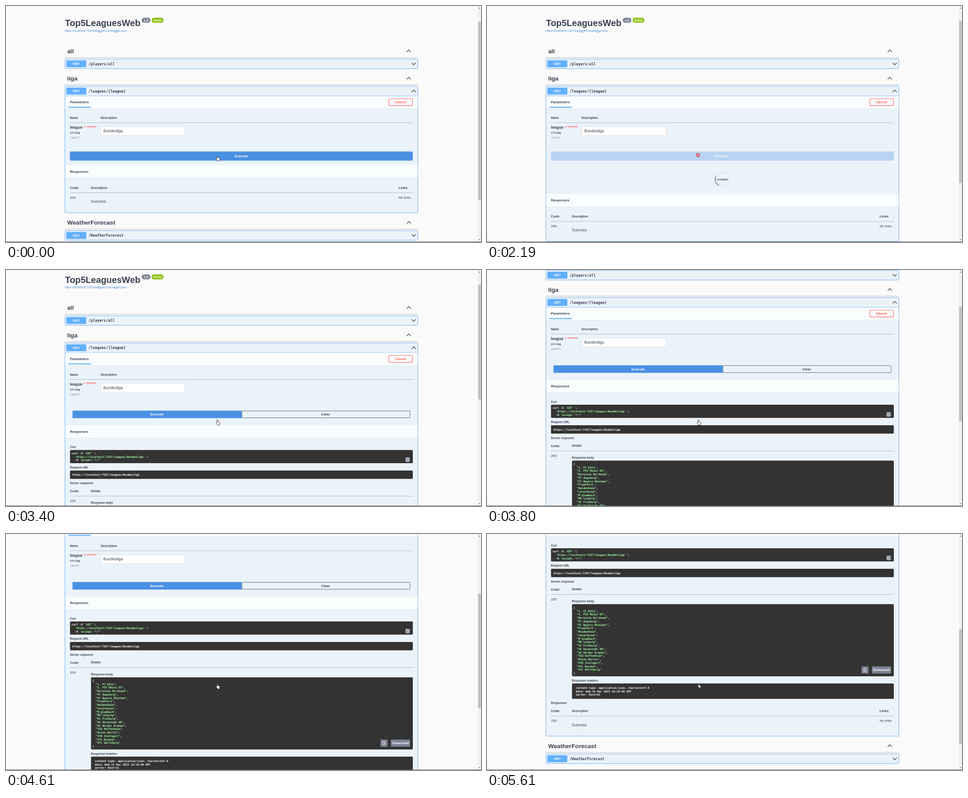
Animation of 1059 by 529 pixels, one loop 6.61 s. Source, as an HTML page:

```html
<!DOCTYPE html>
<html lang="en">
<head>
<meta charset="utf-8">
<title>API explorer</title>
<style>
  html, body { margin: 0; width: 100%; height: 100%; overflow: hidden; background: #fafafa; }
  svg { display: block; width: 1059px; height: 529px; }
  text { font-family: "Liberation Sans", Arial, sans-serif; fill: #3b4151; white-space: pre; }
  .b { font-weight: 700; }
  .i { font-style: italic; }
  .mid { text-anchor: middle; }
  .mono { font-family: "DejaVu Sans Mono", monospace; }
  .white { fill: #fff; }
  .green { fill: #a2fca2; }
  .grey { fill: #808080; }
  .red { fill: #ff5a52; }
  .link { fill: #4990e2; }
</style>
</head>
<body>
<svg id="stage" viewBox="0 0 1059 529"></svg>
<script>
const LOOP = 6610, LOAD_START = 490, LOAD_END = 2600, ARROW_START = 5600;
const TINY = 5.52, SMALL = 6.62, BASE = 7.72, LARGE = 8.83, HEADING = 13.24, CODE = 6.06;

// y is the middle of the capitals
const text = (x, y, size, content, cls = 'b') =>
  `<text x="${x}" y="${y + size * 0.36}" font-size="${size}" class="${cls}">${content}</text>`;
const box = (x1, y1, x2, y2, fill, extra = '') =>
  `<rect x="${x1}" y="${y1}" width="${x2 - x1}" height="${y2 - y1}" fill="${fill}" ${extra}/>`;
const path = (d, stroke, width = 1.1, extra = '') =>
  `<path d="${d}" fill="none" stroke="${stroke}" stroke-width="${width}" ${extra}/>`;
const rule = (x1, x2, y) => box(x1, y - 0.4, x2, y + 0.4, '#3b4151', 'opacity=".42"');
const chevron = (x, y, up) => {
  const d = up ? -2.4 : 2.4;
  return path(`M${x - 4.6} ${y - d}L${x} ${y + d}L${x + 4.6} ${y - d}`, '#22262d', 1.2);
};
const green = s => `<tspan class="green">${s}</tspan>`;
const code = (x, y, content) => text(x, y, CODE, content, 'mono b white');
const dark = (x, y1, y2) => box(x, y1, 907, y2, '#333', 'rx="2.2"');

const tagHeading = (y, name) =>
  text(136.5, y, HEADING, name) + chevron(898, y - 0.3, true) + rule(131, 918, y + 14.4);
const blockFrame = (y1, y2) =>
  box(131, y1 - 0.5, 918.5, y2 + 0.7, 'none', 'rx="2.5" stroke="#000" stroke-opacity=".07"') +
  box(131.6, y1, 918, y2, '#ebf3fa', 'rx="2.2" stroke="#61affe" stroke-width=".9"');
const summary = (y, route, open) =>
  box(134.5, y - 7.7, 179, y + 7.7, '#61affe', 'rx="1.7"') +
  text(156.7, y, BASE, 'GET', 'b white mid') +
  text(184, y + 0.2, 8.1, route, 'mono b') + chevron(909, y, open);
const sectionHeader = (y1, y2) =>
  box(132, y1, 917.5, y2, '#fafdfe') + box(132, y2, 917.5, y2 + 1, '#000', 'opacity=".06"');
const columns = (y, second) =>
  text(142.5, y, BASE, 'Code') + text(189.3, y, SMALL, second) + rule(142.5, 907, y + 11.4);
const clipboard = (x, y, size) =>
  box(x - size / 2, y - size / 2, x + size / 2, y + size / 2, '#7d8293', 'rx="2"') +
  path(`M${x + 2} ${y - 1}v-2h-5v6.5h5v-1.5M${x - 1.8} ${y - 3.6}h2.6M${x + 4} ${y + 0.7}h-4.2l1.5-1.5m-1.5 1.5l1.5 1.5`, '#fff', 0.8);

const clubs = ['1. FC Köln', '1. FSV Mainz 05', 'Borussia Dortmund', 'FC Augsburg',
  'FC Bayern München', 'Frankfurt', 'Heidenheim', 'Leverkusen', "M'gladbach", 'RB Leipzig',
  'SC Freiburg', 'SV Darmstadt 98', 'SV Werder Bremen', 'TSG Hoffenheim', 'Union Berlin',
  'VfB Stuttgart', 'VfL Bochum', 'VfL Wolfsburg'];
const json = ['[', ...clubs.map((name, i) =>
  '  ' + green(`"${name}"`) + (i < clubs.length - 1 ? ',' : '')), ']'];
const endpoint = 'https://localhost:7197/leagues/Bundesliga';

const top5 =
  text(131.5, 38.2, 19.86, 'Top5LeaguesWeb') +
  box(302.5, 26.3, 322, 37.6, '#7d8492', 'rx="5.6"') + text(312.3, 32, 7.2, '1.0', 'b white mid') +
  box(324.5, 26.3, 351.2, 37.6, '#89bf04', 'rx="5.6"') + text(337.8, 32, 7.2, 'OAS3', 'b white mid') +
  text(131, 55.4, SMALL, 'https://localhost:7197/swagger/v1/swagger.json', 'link') +
  tagHeading(101, 'all') + blockFrame(119, 140.3) + summary(129.6, '/players/all', false) +
  tagHeading(162.3, 'liga');

const parameters =
  summary(190.7, '/leagues/{league}', true) +
  box(132, 201, 918, 201.9, '#61affe', 'opacity=".8"') + sectionHeader(202, 230) +
  text(142.5, 215.7, BASE, 'Parameters') + box(138.8, 225.8, 189, 228, '#61affe') +
  box(853.5, 208, 906.3, 223.3, 'none', 'rx="2" stroke="#ff6060" stroke-width="1.2"') +
  text(879.5, 215.6, BASE, 'Cancel', 'b red mid') +
  text(142.5, 251, SMALL, 'Name') + text(211, 251, SMALL, 'Description') + rule(142.5, 907, 261.7) +
  text(142.5, 272, LARGE, 'league') + text(173, 271.5, LARGE, '*', 'b red') +
  text(179.2, 270, TINY, 'required', 'b red') +
  text(142.5, 284.3, CODE, 'string', 'mono b') + text(142.5, 295, CODE, '(path)', 'mono i grey') +
  box(211.3, 270.4, 399.2, 290.6, '#fff', 'rx="2" stroke="#d4d8dc" stroke-width=".8"') +
  text(217, 280.3, LARGE, 'Bundesliga', '');

const wideExecute =
  box(142, 325.7, 907.3, 346.9, 'none', 'rx="2.2" stroke="#a9c9ee" stroke-width="1"') +
  box(142.8, 326.4, 906.6, 346.2, '#4990e2', 'rx="2"') +
  text(524.5, 336.4, BASE, 'Execute', 'b white mid');

const spinner =
  '<circle cx="524.7" cy="388.6" r="16" fill="none" stroke="#555" stroke-opacity=".14" stroke-width="1.1"/>' +
  path('M513.4 377.3A16 16 0 0 1 536 377.3', '#000', 1.2, 'id="arc" stroke-opacity=".6"') +
  text(524.7, 388.6, TINY, 'LOADING', 'b mid');

const result =
  box(148, 331.6, 526, 348.6, 'none', 'rx="2" stroke="#a9c9ee"') +
  box(148.5, 332, 525.6, 348.2, '#4990e2', 'rx="1.5"') +
  text(336.5, 340.2, BASE, 'Execute', 'b white mid') +
  box(526, 332.4, 900.7, 347.8, 'none', 'rx="1.5" stroke="#7b8086" stroke-width="1.2"') +
  text(712.5, 340.2, BASE, 'Clear', 'b mid') +
  text(142.5, 413.2, SMALL, 'Curl') + dark(142.7, 420, 449.6) +
  code(146, 427.2, `curl -X ${green("'GET'")} \\`) +
  code(146, 435, `  ${green(`'${endpoint}'`)} \\`) +
  code(146, 442.7, `  -H ${green("'accept: */*'")}`) +
  clipboard(895.6, 441.6, 10.5) +
  text(142.5, 459, SMALL, 'Request URL') + dark(142.7, 466, 484.7) + code(148, 475.5, endpoint) +
  text(142.5, 494.2, SMALL, 'Server response') + columns(512, 'Details') +
  text(142.5, 534, BASE, '200', '') + text(189.3, 538.6, SMALL, 'Response body') +
  dark(189.5, 545.2, 707) +
  json.map((line, i) => code(192.8, 552.7 + i * 7.75, line)).join('') +
  clipboard(842.8, 692.8, 16) + box(858, 684.8, 901, 700.8, '#7d8293', 'rx="2"') +
  text(879.5, 692.5, BASE, 'Download', 'b white mid') +
  text(189.3, 716.5, SMALL, 'Response headers') + dark(189.5, 723, 757.6) +
  ['content-type: application/json; charset=utf-8', 'date: Wed,13 Dec 2023 16:16:08 GMT', 'server: Kestrel']
    .map((line, i) => code(198, 732.7 + i * 7.75, line)).join('') +
  text(142.5, 767, SMALL, 'Responses');

const tail =
  columns(407.2, 'Description') + text(875.2, 407.2, BASE, 'Links') +
  text(142.5, 428.8, BASE, '200', '') + text(875.2, 428.8, BASE, 'No links', 'i') +
  text(189.3, 438, LARGE, 'Success', '') +
  tagHeading(485.6, 'WeatherForecast') + blockFrame(503.5, 524.8) + summary(514.2, '/WeatherForecast', false);

const cursors =
  `<g id="hand"><path d="M470.4 341.8v-5q0-1 .9-1t.9 1v3.2q1.2-.7 1.6.3 1.2-.5 1.5.5 1.4-.3 1.4 1.2v2q0 1.5-.9 2.5v.9h-4.3v-.9l-2.9-3.6q-.4-1.4.6-1.3z"
    fill="#fff" stroke="#111" stroke-width=".8"/></g>
  <g id="blocked"><circle cx="470.3" cy="334.1" r="3.7" fill="#f6e6e8" stroke="#b51a1a" stroke-width="1.3"/>
    ${path('M467.7 331.5l5.2 5.2', '#b51a1a', 1.3)}</g>
  <g id="arrow"><path d="M471.3 336v9.3l2.1-1.9 1.5 3.2 1.4-.6-1.5-3.2h2.7z"
    fill="#fff" stroke="#111" stroke-width=".5"/></g>`;

document.getElementById('stage').innerHTML =
  box(0, 0, 1059, 529, '#fafafa') +
  `<g id="page">${top5}
    <g id="panel">${blockFrame(180, 463.4)}</g>${parameters}
    <g id="execute">${wideExecute}</g><g id="spinner">${spinner}</g>
    <g id="responses">${sectionHeader(357.3, 385.3)}${text(142.5, 371.3, BASE, 'Responses')}</g>
    <g id="result">${result}</g><g id="tail">${tail}</g></g>` +
  box(1052, 0, 1059, 529, '#f1f1f1') + box(1052.6, 0, 1058.6, 1, '#c1c1c1', 'id="thumb"') +
  '<path d="M1053.8 5.5l1.8-2 1.8 2zM1053.8 523l1.8 2 1.8-2z" fill="#505050"/>' +
  box(0, 528, 1059, 529, '#5a5d60') + cursors;

const el = Object.fromEntries([...document.querySelectorAll('[id]')].map(node => [node.id, node]));
const panelRects = el.panel.querySelectorAll('rect');
const show = (node, on) => node.setAttribute('display', on ? 'inline' : 'none');
const moveY = (node, y) => node.setAttribute('transform', `translate(0 ${y})`);

// [time, scroll offset]
const scrollKeys = [[0, 0], [2600, 0], [2800, 1], [3200, 1], [3400, 16.5], [3800, 118],
  [4400, 221], [4600, 224], [5200, 388], [LOOP, 388]];
function scrollAt(t) {
  const i = scrollKeys.findIndex(key => key[0] > t);
  const [t0, y0] = scrollKeys[i - 1], [t1, y1] = scrollKeys[i];
  return y0 + (y1 - y0) * (t - t0) / (t1 - t0);
}

function draw(now) {
  const t = Math.floor((now % LOOP + 10) / 200) * 200;
  const done = t >= LOAD_END, loading = t >= LOAD_START && !done;
  const scroll = scrollAt(t);
  const tailShift = done ? 377.5 : loading ? 64.3 : 0;

  moveY(el.page, -scroll);
  moveY(el.responses, done ? 7.4 : loading ? 64.3 : 0);
  moveY(el.tail, tailShift);
  panelRects.forEach((rect, i) => rect.setAttribute('height', (i ? 283.4 : 284.6) + tailShift));

  show(el.execute, !done);
  el.execute.setAttribute('opacity', loading ? Math.max(0.3, 1 - 0.7 * (t - LOAD_START) / 300) : 1);
  show(el.spinner, loading);
  el.arc.setAttribute('transform', `rotate(${0.36 * (t - LOAD_START - 7)} 524.7 388.6)`);
  show(el.result, done);

  const [thumbTop, thumbSize] = done ? [25 + scroll * 0.4845, 257] : loading ? [33, 364] : [35, 399];
  el.thumb.setAttribute('y', thumbTop);
  el.thumb.setAttribute('height', thumbSize);

  show(el.blocked, loading);
  show(el.arrow, t >= ARROW_START);
  show(el.hand, !loading && t < ARROW_START);
}

const start = performance.now();
function tick() {
  draw(performance.now() - start);
  requestAnimationFrame(tick);
}
tick();
</script>
</body>
</html>
```
